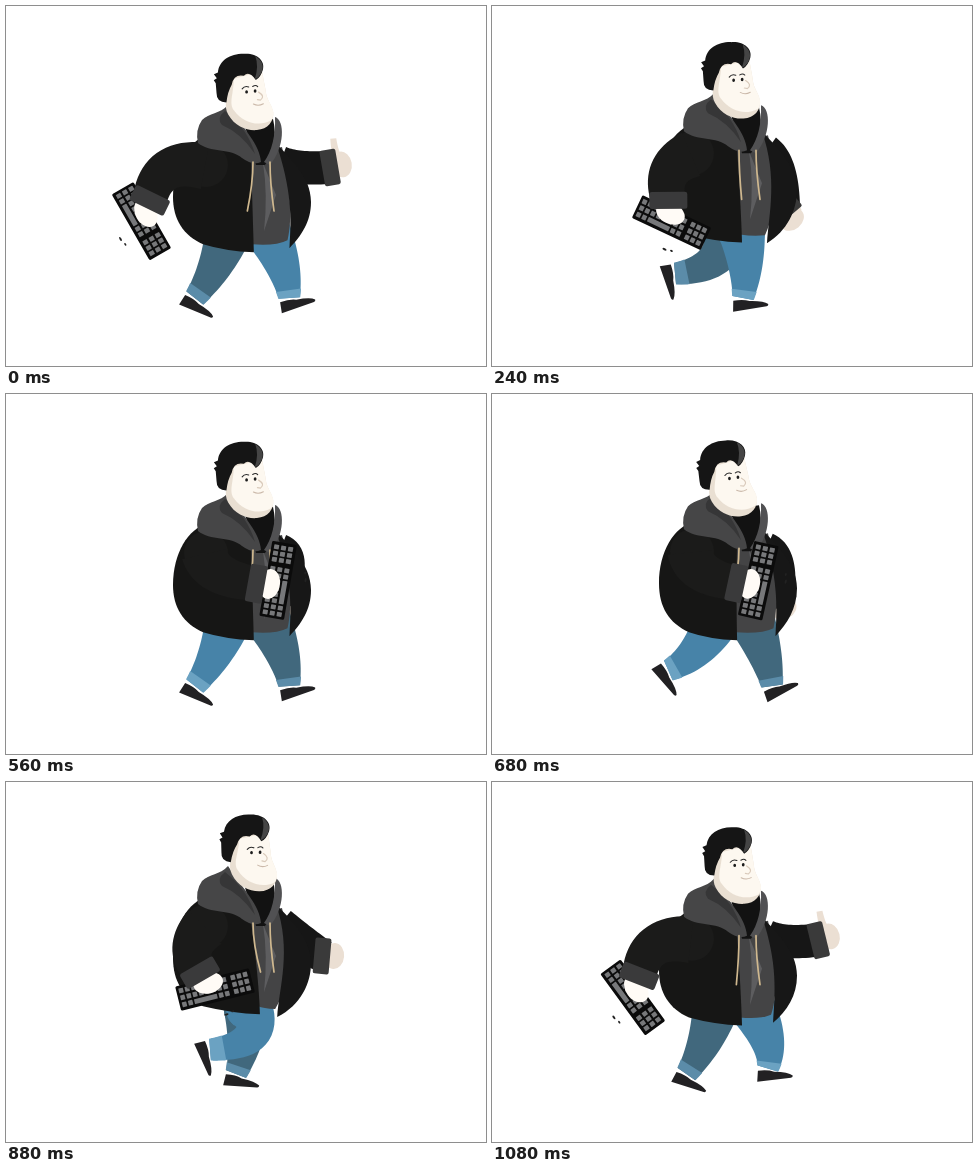
An HTML page with a canvas that plays this animation: 480 px wide and 360 px high, repeating every 1.12 s.

```html
<!DOCTYPE html>
<html>
<head>
<meta charset="utf-8">
<style>
html, body { margin: 0; width: 100%; height: 100%; overflow: hidden; background: #fff; }
canvas { display: block; }
</style>
</head>
<body>
<canvas id="stage" width="480" height="360"></canvas>
<script>
const ctx = document.getElementById('stage').getContext('2d');
const LOOP = 1120, STEP = LOOP / 2;

// Swing between -1 and 1 that is highest at the time `peak`
const swing = (t, peak, period = LOOP) => Math.cos((t - peak) / period * 2 * Math.PI);
const clamp = v => Math.max(0, Math.min(1, v));

function fill(d, color) {
  ctx.fillStyle = color;
  ctx.fill(new Path2D(d));
}
function line(d, color, width) {
  ctx.strokeStyle = color;
  ctx.lineWidth = width;
  ctx.lineCap = 'round';
  ctx.stroke(new Path2D(d));
}
function oval(x, y, rx, ry, color) {
  ctx.fillStyle = color;
  ctx.beginPath();
  ctx.ellipse(x, y, rx, ry, 0, 0, 7);
  ctx.fill();
}
function box(x, y, w, h, r, color) {
  ctx.fillStyle = color;
  ctx.beginPath();
  ctx.roundRect(x, y, w, h, r);
  ctx.fill();
}
function place(x, y, degrees, draw) {
  ctx.save();
  ctx.translate(x, y);
  ctx.rotate(degrees * Math.PI / 180);
  draw();
  ctx.restore();
}

// Tapered curve from a around b to c
function limb(a, b, c, w0, w1, color, from = 0) {
  const left = [], right = [];
  for (let i = 0; i <= 20; i++) {
    const u = from + (1 - from) * i / 20, v = 1 - u;
    const at = k => v * v * a[k] + 2 * u * v * b[k] + u * u * c[k];
    const dx = v * (b[0] - a[0]) + u * (c[0] - b[0]);
    const dy = v * (b[1] - a[1]) + u * (c[1] - b[1]);
    const s = (w0 + (w1 - w0) * u) / 2 / Math.hypot(dx, dy);
    left.push([at(0) - dy * s, at(1) + dx * s]);
    right.unshift([at(0) + dy * s, at(1) - dx * s]);
  }
  fill('M' + left.concat(right).join('L') + 'Z', color);
}

// t = 0 is the heel strike in front
function leg(t, color, cuff) {
  const hip = 242 + 20 * swing(t, 30);
  const x = 226 + 53 * swing(t, 84) + 10 * swing(t, 0, STEP);
  const y = 292 - 25 * Math.max(0, swing(t, 840));
  const tilt = 18 + 42 * swing(t, 747) + 17 * swing(t, 305, STEP);
  const bend = 6 + 36 * Math.max(0, swing(t, 920)) ** 3;
  const a = [hip, 226], b = [(hip + x) / 2 + bend, 263], c = [x, y];
  place(x, y, tilt, () =>
    fill('M-12 12L-10 1Q0 1 6 4Q20 6 24 10Q24 12 22 12Z', '#222123'));
  oval(hip, 228, 23, 20, color);
  limb(a, b, c, 47, 21, color);
  limb(a, b, c, 47, 22, cuff, .87);
}

function farArm(t, lift) {
  const drop = (1 - swing(t, -80)) / 2;
  const x = 327 - 58 * drop, y = Math.min(205, 157 + 90 * drop);
  const thumb = clamp(2 * swing(t, 60) - .7);
  limb([274, 158 + lift], [291, 164 + lift / 2], [x, y], 34, 33, '#161616');
  place(x, y, 106 * drop - 15, () => {
    oval(12, -1, 10, 13, '#ebdfd3');
    limb([10, -6], [7, -12], [8, -8 - 20 * thumb], 9, 6, '#ebdfd3');
    box(-8, -18, 16, 36, 2, '#3a3a3a');
  });
}

function clothes(t, lift) {
  const sway = swing(t, 60, STEP);
  const hx = 250 + 5 * swing(t, 380, STEP), hy = 240 + 8 * sway;
  const tx = 278 + 7 * sway, ty = 239 + 4 * sway;
  const back = 167, side = 305;
  const y = v => v + lift;
  fill(`M243 ${y(150)}L276 ${y(142)}C284 ${y(180)} 287 ${y(212)} ${tx - 2} ${ty - 8}
    Q${tx - 14} ${hy - 6} ${hx - 2} ${hy - 8}Z`, '#444445');
  fill(`M257 ${y(158)}L270 ${y(190)}L258 ${y(226)}Q262 ${y(190)} 257 ${y(158)}`, '#5d5d5f');
  fill(`M270 ${y(138)}C282 ${y(152)} ${side} ${y(170)} ${side} ${y(197)}
    C${side} ${y(217)} ${side - 10} ${ty - 12} ${tx} ${ty}
    C${tx + 2} ${ty - 30} 286 ${y(185)} 270 ${y(138)}`, '#171717');
  fill(`M202 ${y(130)}C182 ${y(136)} ${back} ${y(160)} ${back} ${y(192)}
    C${back} ${hy - 33} ${back + 10} ${hy - 17} ${back + 30} ${hy - 8}
    Q${hx - 28} ${hy - 1} ${hx} ${hy}Q${hx - 1} ${hy - 35} 245 ${y(155)}Z`, '#161615');
}

function hood(t, lift) {
  const y = v => v + lift;
  fill(`M238 ${y(118)}L267 ${y(114)}Q273 ${y(140)} 259 ${y(160)}L250 ${y(160)}Z`, '#121212');
  fill(`M222 ${y(100)}C214 ${y(109)} 203 ${y(108)} 196 ${y(115)}Q189 ${y(125)} 192 ${y(138)}
    C204 ${y(148)} 225 ${y(143)} 236 ${y(153)}Q247 ${y(161)} 255 ${y(157)}
    C254 ${y(140)} 238 ${y(124)} 222 ${y(100)}`, '#464647');
  fill(`M219 ${y(106)}Q210 ${y(113)} 216 ${y(120)}Q235 ${y(128)} 249 ${y(149)}
    Q242 ${y(124)} 219 ${y(106)}`, '#363637');
  fill(`M269 ${y(112)}C279 ${y(115)} 279 ${y(142)} 264 ${y(160)}L258 ${y(157)}
    Q270 ${y(140)} 269 ${y(112)}`, '#515153');
  for (const [top, end] of [[247, 247 + 8 * swing(t, 350, STEP)], [264, 268]])
    line(`M${top} ${y(157)}Q${top} ${y(178)} ${end} ${y(206)}`, '#cfb88f', 1.7);
}

function head() {
  fill(`M220 78C220 94 216 101 221 110C228 122 240 126 250 125C261 124 267 116 266 107
    C264 98 259 95 258 85L254 66L225 70Z`, '#e9dfd2');
  fill(`M226 74C226 90 221 99 227 106C236 118 252 122 264 115Q267 111 266 106
    C264 98 259 95 258 85L254 66Z`, '#fdf8f0');
  fill(`M219 98Q209 98 209 89L208 79L206 76L209 74L206 70L210 68C211 56 222 49 236 49
    C249 48 257 56 255 64Q253 72 248 75Q241 65 236 71Q226 69 224 80Q220 87 219 98`, '#151515');
  fill('M247 51C254 55 256 61 254 66Q251 73 247 74Q251 61 247 51', '#454545');
  oval(239, 87, 1.4, 1.7, '#1c1c1c');
  oval(247.5, 86, 1.4, 1.7, '#1c1c1c');
  line('M234.5 84Q237 80.5 241 82M245 81.5Q248 79.5 250 81.5', '#2a2a2a', 1.1);
  line('M251 87Q258 91 253 95L250 94.5', '#d9cabb', 1.2);
  line('M246 99Q251 101.5 256 98.5', '#cbb9aa', 1);
}

function keyboard() {
  box(-38, -12.5, 76, 25, 1.5, '#0b0b0b');
  const key = (x, y, w = 4.6) => box(x, y, w, 5, .5, '#77787a');
  for (let row = 0; row < 3; row++) {
    for (let col = 0; col < 11; col++) {
      const underSpace = row == 2 && col > 1 && col < 6;
      if (!underSpace) key(-35.5 + col * 6.3 + (col > 7 ? 3 : 0), -9.8 + row * 7.1);
    }
  }
  key(-22.9, 4.4, 23.5);
  oval(5, 27, 2.2, 1, '#222');
  oval(12, 25.5, 1.5, .9, '#222');
}

function nearArm(t, lift, drawHood) {
  const forward = swing(t, 590);
  const cuff = [197 + 54 * forward, 192 + 3 * swing(t, 120)];
  const elbow = [178 + 27 * forward, 168 + 17 * forward];
  const cuffTilt = 55 * swing(t, 50) - 27, keyTilt = 73 * swing(t, 50) - 10;
  oval(200, 160 + lift, 22, 22, '#1b1b1a');
  limb([199, 161 + lift], elbow, cuff, 47, 34, '#1b1b1a');
  drawHood();
  place(...cuff, cuffTilt, () => {
    place(2, 13, keyTilt - cuffTilt, () => {
      ctx.translate(5, 8);
      keyboard();
      oval(-5, -8, 15, 10.5, '#fffbf6');
    });
    box(-19, -8.5, 38, 17, 2.5, '#3a3a3b');
  });
}

function draw(t) {
  const lift = 8 * swing(t, 45, STEP) - 8;
  const nod = 2 + 3 * swing(t, 390, STEP);
  ctx.fillStyle = '#fff';
  ctx.fillRect(0, 0, 480, 360);
  farArm(t, lift);
  leg(t + STEP, '#41687d', '#5b8ca9');
  leg(t, '#4783a8', '#6ba2c2');
  clothes(t, lift);
  nearArm(t, lift, () => {
    hood(t, lift);
    place(245 + nod, 120 + lift, nod, () => {
      ctx.translate(-245, -120);
      head();
    });
  });
}

function tick(now) {
  draw(Math.floor(now / 40) * 40 % LOOP);
  requestAnimationFrame(tick);
}
draw(0);
requestAnimationFrame(tick);
</script>
</body>
</html>
```
